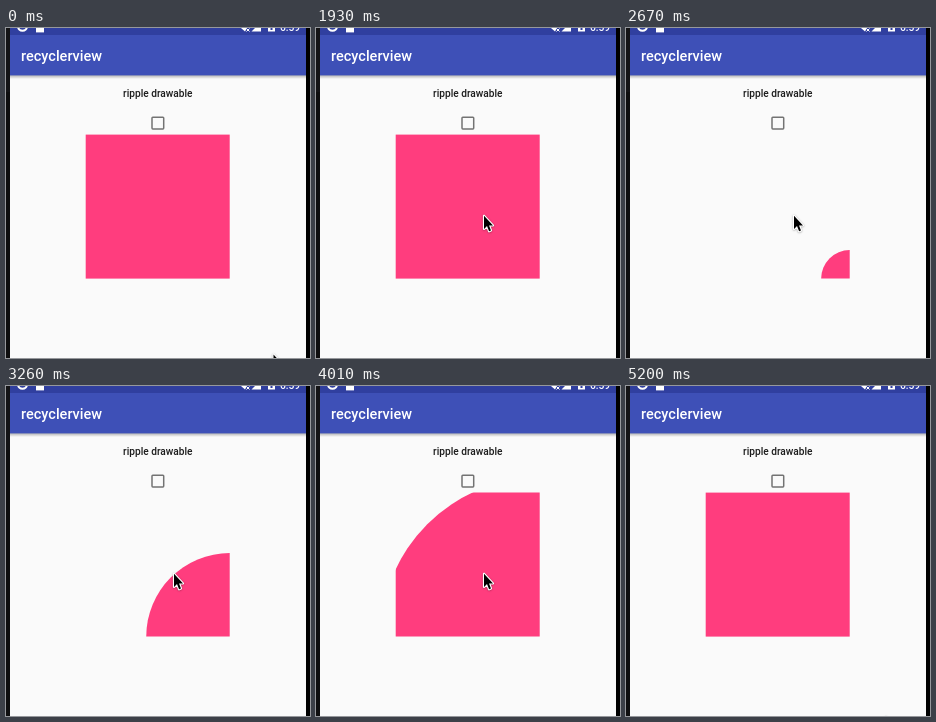
Recreate the animation shown at these times as an HTML page with a canvas. Size 304 by 330 pixels, loop 5590 ms.

```html
<!DOCTYPE html>
<html lang="en">
<head>
<meta charset="utf-8">
<title>Ripple drawable</title>
<style>
html, body { margin: 0; width: 100%; height: 100%; overflow: hidden; background: #000; }
canvas { display: block; }
</style>
</head>
<body>
<canvas id="stage" width="304" height="330"></canvas>
<script>
const ctx = document.getElementById('stage').getContext('2d');
const LOOP = 5590;
const TICK = 148.5;      // screen refresh interval
const LEAD = 10;         // refreshes land slightly early
const LAST_STEP = 35;

const PINK = '#ff3d7e';
const box = { x: 79.7, y: 106.6, size: 144 };
const reveal = { start: 1930, length: 3000 };

const peek = [267.5, 326.5];
const hover = [263, 324.5];
const enter = [233, 277];
const rest = [168, 187.7];
const leave = [260, 331];

const clamp = v => Math.min(1, Math.max(0, v));
const easeOut = p => 1 - (1 - p) ** 2;
const mix = (a, b, p) => a.map((v, i) => v + (b[i] - v) * p);

function rect(x, y, w, h, color) {
  ctx.fillStyle = color;
  ctx.fillRect(x, y, w, h);
}

function text(str, x, y, size, color, align = 'left') {
  ctx.font = `500 ${size}px Roboto, sans-serif`;
  ctx.textAlign = align;
  ctx.fillStyle = color;
  ctx.fillText(str, x, y);
}

function polygon(...points) {
  ctx.beginPath();
  points.forEach(([x, y]) => ctx.lineTo(x, y));
  ctx.closePath();
}

function line(x1, y1, x2, y2) {
  ctx.beginPath();
  ctx.moveTo(x1, y1);
  ctx.lineTo(x2, y2);
  ctx.stroke();
}

function drawStatusBar() {
  rect(4, 0, 296, 7, '#303f9f');
  ctx.strokeStyle = '#fff';
  ctx.lineWidth = 2;
  ctx.beginPath();
  ctx.arc(16.5, -1.7, 4.5, 0, Math.PI * 2);
  ctx.stroke();
  rect(30, 0, 8, 4.4, '#fff');

  ctx.fillStyle = '#fff';
  polygon([235, 0], [241, 0], [239, 3.5]);
  ctx.fill();
  polygon([245.5, 3.5], [249, 0], [255, 0], [255, 3.5]);
  ctx.fill();
  ctx.lineWidth = 1;
  line(240.5, 3.5, 243.5, 0.5);
  line(240.5, 0.5, 243.5, 3.5);
  rect(262, 0, 7, 3.5, '#fff');
  rect(264.5, 0, 2, 2, '#303f9f');
  text('6:59', 274, 3, 10.2, '#fff');
}

function drawScreen() {
  rect(0, 0, 304, 330, '#000');
  rect(0, 0, 4, 330, '#0e0e0f');
  rect(0, 0, 4, 64, '#141416');
  rect(4, 0, 296, 330, '#fafafa');

  const shade = ctx.createLinearGradient(0, 47, 0, 51);
  shade.addColorStop(0, 'rgba(0,0,0,.3)');
  shade.addColorStop(1, 'rgba(0,0,0,0)');
  rect(4, 47, 296, 4, shade);

  rect(4, 7, 296, 40.4, '#3e50b7');
  drawStatusBar();
  text('recyclerview', 15, 33, 14.5, '#fff');
  text('ripple drawable', 151.8, 69.4, 10.15, '#1c1c1c', 'center');

  ctx.strokeStyle = '#737373';
  ctx.lineWidth = 1.5;
  ctx.beginPath();
  ctx.roundRect(146, 89.2, 11.7, 11.7, 0.8);
  ctx.stroke();
}

// Circle growing from the lower right corner, clipped to the square
function drawReveal(t) {
  const { x, y, size } = box;
  const p = clamp((t - reveal.start) / reveal.length);
  if (p === 0 || p === 1) {
    rect(x, y, size, size, PINK);
    return;
  }
  const radius = size * Math.SQRT2 * (1 - Math.cos(Math.PI * p)) / 2;
  ctx.save();
  ctx.beginPath();
  ctx.rect(x, y, size, size);
  ctx.clip();
  ctx.beginPath();
  ctx.arc(x + size, y + size, radius, 0, Math.PI * 2);
  ctx.fillStyle = PINK;
  ctx.fill();
  ctx.restore();
}

// Peeks in twice, glides to the square, rests, then leaves
function pointerAt(step) {
  if (step < 3) return peek;
  if (step === 3 || step === 6) return hover;
  if (step < 10) return null;
  if (step < 28) return mix(enter, rest, easeOut(clamp((step - 10) / 3)));
  return mix(rest, leave, clamp((step - 28.3) / (LAST_STEP - 28.3)));
}

function drawPointer(step) {
  const tip = pointerAt(step);
  if (!tip) return;
  ctx.save();
  ctx.translate(...tip);
  polygon([0, 0], [0, 13.2], [3, 10.4], [5.1, 15.6], [7, 14.8], [5, 9.7], [9, 9.7]);
  ctx.lineWidth = 2.2;
  ctx.lineJoin = 'round';
  ctx.strokeStyle = '#fff';
  ctx.shadowColor = 'rgba(0,0,0,.35)';
  ctx.shadowBlur = 2;
  ctx.shadowOffsetY = 0.5;
  ctx.stroke();
  ctx.shadowColor = 'transparent';
  ctx.fillStyle = '#000';
  ctx.fill();
  ctx.restore();
}

function draw(now) {
  const step = Math.min(LAST_STEP, Math.floor((now % LOOP + LEAD) / TICK));
  drawScreen();
  drawReveal(step * TICK - LEAD);
  drawPointer(step);
}

let begin = null;
function loop(now) {
  if (begin === null) begin = now;
  draw(now - begin);
  requestAnimationFrame(loop);
}

draw(0);
requestAnimationFrame(loop);
</script>
</body>
</html>
```
